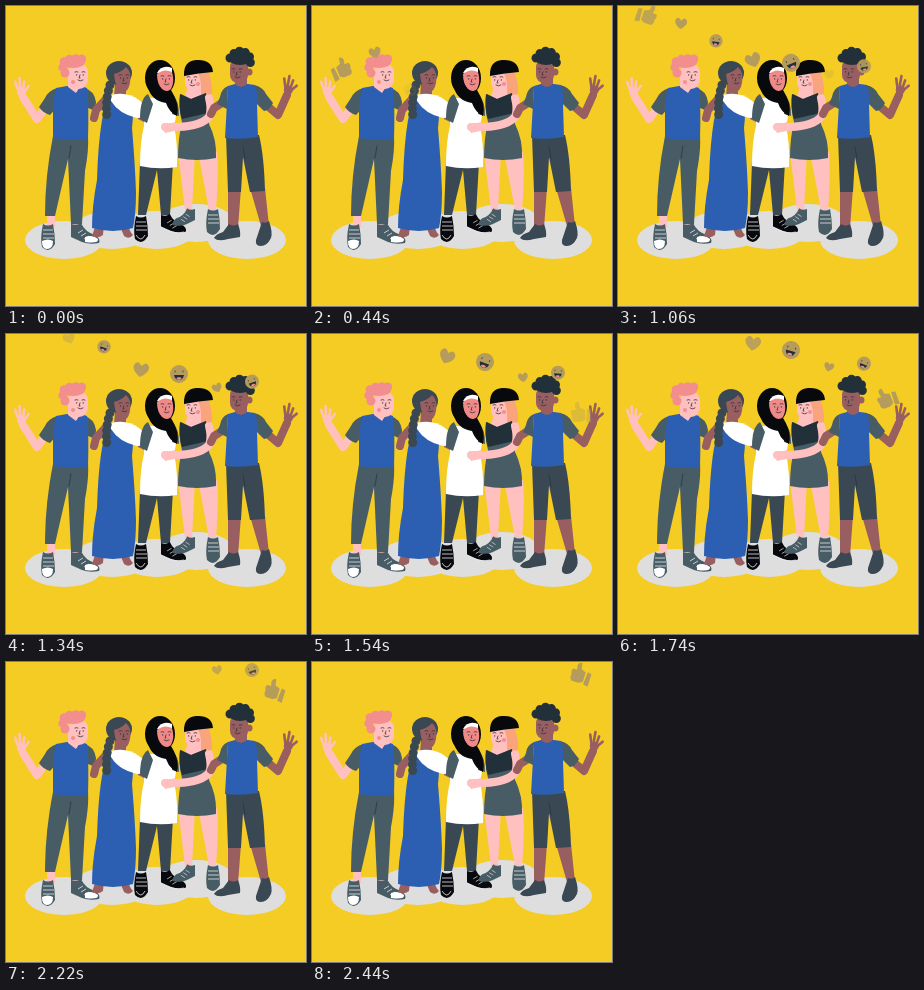
These frames come from a looping animation (300 by 300 pixels, 2460 ms). An HTML page:

```html
<!DOCTYPE html>
<html lang="en">
<head>
<meta charset="utf-8">
<title>Friends</title>
<style>
  html, body { margin: 0; width: 100%; height: 100%; overflow: hidden; background: #f4cc23; }
  svg { display: block; width: 100vw; height: 100vh; }
  .pink { --c: #ffc0bf; }
  .coral { --c: #f08a88; }
  .brown { --c: #995f60; }
  .slate { --c: #485c65; }
  .dark { --c: #3a4853; }
  .ink { --c: #22303a; }
  .black { --c: #08090c; }
  .blue { --c: #2c5eb2; }
  .white { --c: #fff; }
  .rose { --c: #f28e8d; }
  .blond { --c: #f9a47c; }
  .icon { --c: #b59c5c; }
  svg * { fill: var(--c); }
  svg .limb, svg .dots, svg .hand { fill: none; stroke: var(--c); stroke-linecap: round; stroke-linejoin: round; }
  .limb { stroke-width: 8; }
  .hand { stroke-width: 2.6; }
  .dots { stroke-width: 9; stroke-dasharray: 0 6; }
  svg .line { fill: none; stroke: #2b3640; stroke-width: .8; stroke-linecap: round; }
  svg .lace { fill: none; stroke: #e6eaec; stroke-width: .8; }
</style>
</head>
<body>
<svg viewBox="0 0 300 300">
  <defs>
    <g id="look">
      <path class="line" d="M-3.300-1.500v.8M3.300-1.500v.8" stroke-width="1.500"/>
      <path class="line" d="M-5-4q2-1 3 0M2-4q2-1 3 0M0-1l-1 3h1M-2 4q2 2 5 0"/>
    </g>
    <g id="wave">
      <circle cy="-3" r="4.500"/>
      <path class="hand" d="M-3-5l-2-9M-1-6l1-11M2-5l2-8M3-3l5-5"/>
    </g>
    <g id="front">
      <path d="M-5 0q5 3 10 0 2 10 2 20-6 10-13 3-2-9 1-23z"/>
      <path class="lace" d="M-5 6H5M-5 10H6M-5 14H6"/>
    </g>
    <g id="side">
      <path d="M0 0q6 2 10-1 4 9 14 12 6 4 4 8-9 2-17-1L0 13z"/>
      <path class="lace" d="M7 9l5-3M10 12l5-3M13 15l5-3"/>
    </g>

    <path id="thumb" d="M-10-3l4-1 1 13-5 1zM-4-3L1-5 2-11q4 0 4 4L5-3h4q2 2 0 6 1 4-2 6H0l-4-2z"/>
    <path id="heart" d="M0 7Q-8 2-7-3-4-9 0-3 4-9 7-3 8 2 0 7z"/>
    <g id="face">
      <circle r="9"/>
      <path class="line" d="M-4-3v1M4-3v1" stroke-width="2"/>
      <path class="ink" d="M-5 1h10q-1 5-5 5t-5-5z"/>
      <ellipse class="rose" cy="4.500" rx="2.500" ry="1.300"/>
    </g>
  </defs>

  <g style="--c: #dedede">
    <ellipse cx="58" cy="234" rx="39" ry="19"/>
    <ellipse cx="106" cy="224" rx="39" ry="19"/>
    <ellipse cx="151" cy="224" rx="38" ry="19"/>
    <ellipse cx="190" cy="217" rx="38" ry="19"/>
    <ellipse cx="241" cy="234" rx="39" ry="19"/>
  </g>

  <!-- left man -->
  <g class="pink">
    <path d="M41 205h8v16h-8zM67 212h8v12h-8z"/>
    <path class="limb" d="M17 91L31 113 42 99"/>
    <use href="#wave" transform="translate(16 89) rotate(-8)"/>
  </g>
  <path class="slate" d="M47 130h35q1 14-3 35l-3 53H65l-3-65-13 57H39q0-40 8-80z"/>
  <path class="line" d="M63 152l2-12"/>
  <use class="slate" href="#front" x="42" y="218"/>
  <path class="white" d="M36 235q6-3 11 0 0 8-6 8-5 0-5-8z"/>
  <use class="slate" href="#side" x="65" y="218"/>
  <path class="white" d="M79 231q8-3 13 2 1 5-13 3z"/>
  <path class="slate" d="M51 82q-9 3-12 10l-6 9q4 6 11 8l8-9zM78 82q10 2 12 14l-1 9-9-4z"/>
  <path class="blue" d="M50 82l11-2h13l7 2q2 14 1 51-18 2-35-1V98z"/>
  <path class="pink" d="M62 72h12v9l-4 6-8-6z"/>
  <rect class="pink" x="62" y="57" width="20" height="26" rx="9"/>
  <path class="rose dots" d="M59 67Q52 54 66 53T79 55"/>
  <ellipse class="rose" cx="67" cy="56" rx="12" ry="6"/>
  <circle class="rose" cx="67" cy="76" r="2"/>
  <use href="#look" x="74" y="70"/>

  <!-- woman in the long dress -->
  <g class="brown">
    <path d="M90 218h8l-1 11q-5 4-11 1zM113 218h9q1 7 5 11-4 5-9 1z"/>
    <path class="limb" d="M101 92L90 104l-2 8"/>
    <path d="M133 102l8 4-1 11-8-4z"/>
    <path d="M109 78h11v13h-12z"/>
  </g>
  <path class="blue" d="M101 92h25q2 14 0 30 3 36 4 64 0 22-3 36-20 6-41 0 0-22 5-48 1-36 5-60z"/>
  <path class="white" d="M105 89q16-4 28 5 8 6 8 12-3 6-10 6-18-4-26-17z"/>
  <ellipse class="dark" cx="113" cy="67" rx="13" ry="12"/>
  <path class="brown" d="M108 68q8-2 12-7 6 5 4 16-2 10-8 9-6-1-8-18z"/>
  <path class="dark dots" d="M104 79Q99 94 101 112"/>
  <use href="#look" x="118" y="73"/>

  <!-- woman in the headscarf -->
  <path class="dark" d="M134 156h33l-3 53h-9l-4-45-11 45h-8z"/>
  <use class="black" href="#front" x="135" y="210"/>
  <use class="black" href="#side" transform="translate(155 209) scale(.88)"/>
  <path class="lace" d="M130 229q5 8 9 0M155 221q12 8 23 5"/>
  <path class="white" d="M139 92h30q3 14-1 28 4 18 3 41-19 3-37-1 0-24 4-40z"/>
  <path class="slate" d="M142 88q-8 4-8 25l7 4 6-19zM167 90q6 4 6 20l-7-2z"/>
  <ellipse class="black" cx="154" cy="72" rx="15" ry="18"/>
  <path class="black" d="M142 82q4 13 18 15 3 9 11 13 3-12-6-26z"/>
  <path class="white" d="M151 67q5-9 15-5v8z"/>
  <path class="coral" d="M151 68q7-6 15-2 3 10-1 17-4 4-9 0-5-5-5-15z"/>
  <use href="#look" x="160" y="74"/>

  <!-- woman in the beanie -->
  <path class="pink" d="M172 146h17l-3 58h-7zM192 146h19q2 20-1 58h-7z"/>
  <use class="slate" href="#side" transform="translate(189 203) scale(-.78 .85)"/>
  <use class="slate" href="#front" x="207" y="203"/>
  <path class="blond" d="M178 66h24q5 12 4 22l-12 2-14-8z"/>
  <path class="pink" d="M183 76h12v13l7 6-14 8-9-12z"/>
  <path class="slate" d="M175 88l10 5 15-6 3 31q8 16 7 34-19 4-38 0 0-20 4-36-4-13-1-28z"/>
  <path class="ink" d="M174 88l11 5 15-6 2 20-26 6q-4-13-2-25z"/>
  <path class="limb pink" d="M203 92q3 12 0 19-8 9-31 10l-13 0"/>
  <path class="pink" d="M155 120l14-4 4 8-14 3z"/>
  <rect class="pink" x="179" y="63" width="18" height="22" rx="8"/>
  <path class="blond" d="M191 65q5 10 4 20l9 4q3-12-2-24z"/>
  <path class="black" d="M178 68q0-13 12-14 16-1 17 12-14 1-29 4z"/>
  <circle class="rose" cx="192" cy="78" r="2"/>
  <use href="#look" x="186" y="75"/>

  <!-- right man -->
  <g class="brown">
    <path d="M222 182h13l-3 40h-10zM244 182h15l4 38h-8z"/>
    <path class="limb" d="M216 97l-8 5-3 6M258 97l14 12 9-20"/>
    <use href="#wave" transform="translate(282 87) rotate(5)"/>
  </g>
  <path class="dark" d="M220 129h33q5 20 6 56l-15 1-7-35-2 35h-13z"/>
  <path class="line" d="M239 153l-2-12"/>
  <path class="dark" d="M223 218q5 3 9 0 3 8 2 13l-12 2q-10 3-14-1 2-4 9-6zM256 216q4 2 7-1 4 12 2 17-4 8-10 8-6 0-5-6z"/>
  <path class="slate" d="M222 80q-7 3-8 11l-3 7 10 5zM248 79q9 2 12 9l7 9q-3 7-9 8l-9-9z"/>
  <path class="blue" d="M222 80l7-2h13l7 1q3 10 2 20l1 32q-16 3-33 1z"/>
  <path class="brown" d="M229 70h12v8q-6 6-12 0z"/>
  <rect class="brown" x="224" y="53" width="18" height="24" rx="8"/>
  <circle class="brown" cx="243" cy="66" r="3.500"/>
  <path class="ink dots" d="M224 52Q230 43 238 46T244 59"/>
  <ellipse class="ink" cx="234" cy="53" rx="11" ry="6"/>
  <use href="#look" x="231" y="67"/>

  <g id="icons" class="icon"></g>
</svg>
<script>
  const LOOP = 2460, STEP = 20;
  const LEAD = 570, FADE = 130, LEVEL = 40;

  // Every icon rises steadily and crosses LEVEL at time `mid`
  const icons = [
    { shape: 'thumb', x: 29, mid: 700, speed: .088 },
    { shape: 'heart', x: 63, mid: 575, speed: .047, size: .85 },
    { shape: 'face', x: 98, mid: 996, speed: .079, size: .74 },
    { shape: 'heart', x: 135, mid: 1270, speed: .066, size: 1.1 },
    { shape: 'face', x: 173, mid: 1340, speed: .06 },
    { shape: 'heart', x: 211, mid: 1600, speed: .052, size: .7 },
    { shape: 'face', x: 246, mid: 1510, speed: .045, size: .78 },
    { shape: 'thumb', x: 269, mid: 2064, speed: .074, flip: true }
  ];

  const layer = document.getElementById('icons');
  for (const icon of icons) {
    icon.node = document.createElementNS(layer.namespaceURI, 'use');
    icon.node.setAttribute('href', '#' + icon.shape);
    layer.append(icon.node);
  }

  const clamp = v => Math.max(0, Math.min(1, v));

  function draw(now) {
    const t = Math.floor(now % LOOP / STEP) * STEP;
    for (const { node, x, mid, speed, size = 1, flip } of icons) {
      const age = t - mid;
      const y = LEVEL - speed * age;
      const turn = 22 * Math.sin(age / 170);
      node.setAttribute('opacity', clamp((age + LEAD) / FADE) * clamp(y / 10));
      node.setAttribute('transform',
        `translate(${x} ${y}) rotate(${turn}) scale(${flip ? -size : size} ${size})`);
    }
  }

  const start = performance.now();
  function tick() {
    draw(performance.now() - start);
    requestAnimationFrame(tick);
  }
  tick();
</script>
</body>
</html>
```
